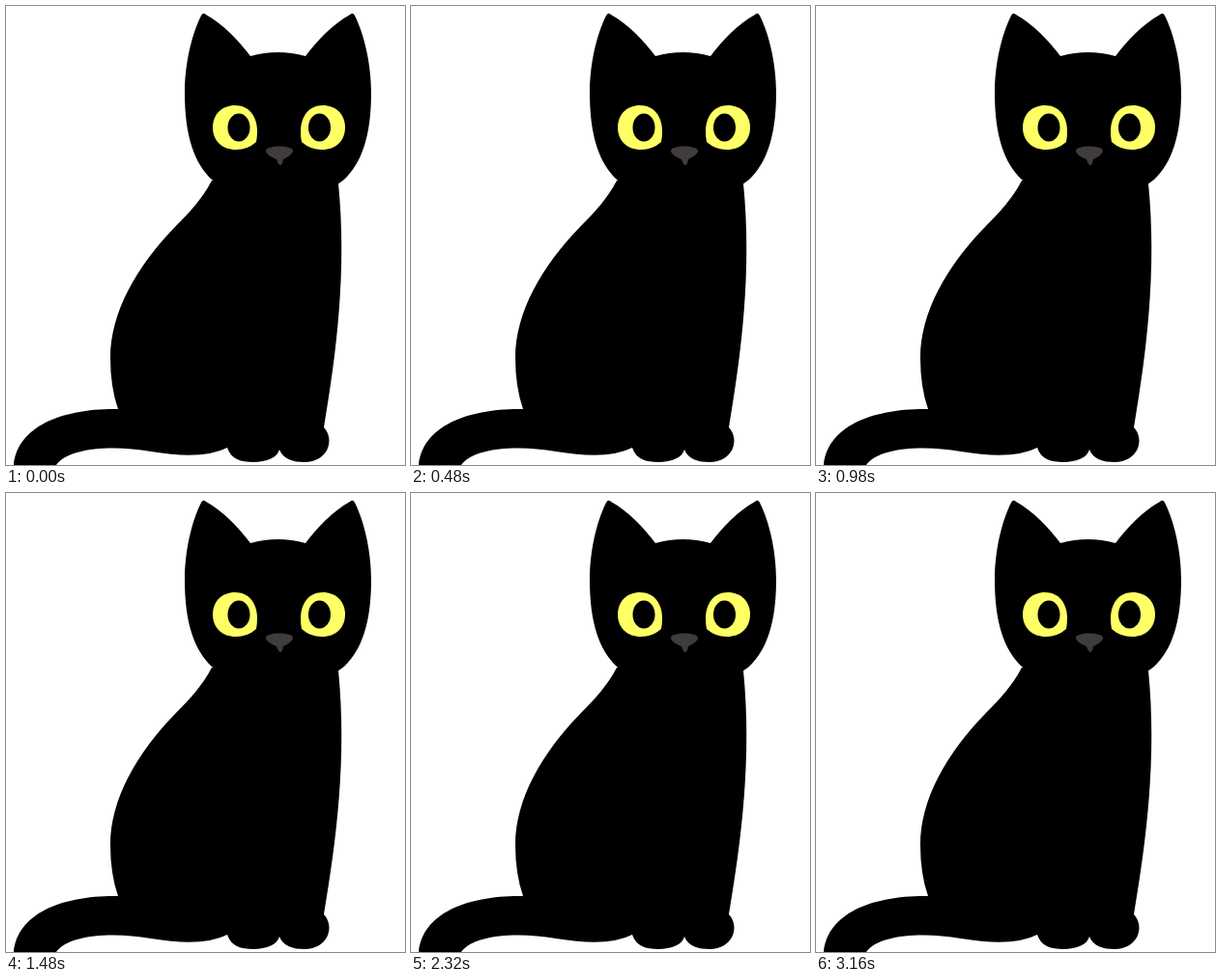
Animation of 413x476 px, one loop 3580 ms. Source, as an HTML page:

```html
<!DOCTYPE html>
<html lang="en">
<head>
<meta charset="utf-8">
<title>Black cat</title>
<style>
  html, body { margin: 0; width: 100%; height: 100%; overflow: hidden; background: #fff; }
  svg { display: block; width: 413px; height: 476px; }
  #bones { fill: #fff; opacity: 0; }
  .line { fill: none; stroke: #fff; stroke-linecap: round; }
  .dark { fill: #000; }
</style>
</head>
<body>
<svg viewBox="0 0 413 476">
  <defs>
    <path id="head" d="M282 48Q267 48 253 52C241 36 225 19 207 9Q204 6 202 10C192 30 185 60 185 90C185 135 195 163 213 180Q222 188 245 195H282Z"/>
    <path id="eye" d="M214 126C214 112 224 103 237 103C251 103 260 114 260 130Q260 136 259 141Q250 149 238 149C224 149 214 140 214 126Z"/>
    <g id="skull">
      <path d="M283 68C232 68 203 92 203 122C203 152 219 168 250 168Q252 176 258 180Q261 182 263 178L267 171H283Z"/>
      <path d="M283 180H273L266 186Q274 188 283 188Z"/>
      <path class="dark" d="M214 126C214 112 225 103 237 103C251 103 260 115 260 132Q260 141 254 145Q246 148 237 147C223 147 214 139 214 126Z"/>
    </g>
    <path id="shoulder" d="M237 215Q241 200 249 205L284 220Q288 223 281 225C265 229 250 228 241 225Q235 222 237 215Z"/>
  </defs>

  <use href="#head"/>
  <use href="#head" transform="translate(563) scale(-1 1)"/>
  <path d="M213 181C203 200 190 214 176 228C135 270 108 318 108 365Q108 395 116 418C60 417 12 435 8 476H52C65 458 110 455 150 462Q204 471 229 458C233 470 243 473 256 473C270 473 281 468 283 460C287 470 297 473 309 473C333 473 341 450 329 437C342 360 353 275 344 184Z"/>

  <g fill="#ffff66">
    <use href="#eye"/>
    <use href="#eye" transform="translate(565) scale(-1 1)"/>
  </g>
  <g id="pupils">
    <ellipse cx="241" cy="126" rx="11.5" ry="14.5"/>
    <ellipse cx="324.5" cy="126" rx="11.5" ry="14.5"/>
  </g>
  <path fill="#403c3d" d="M269 150C269 144 297 144 297 150C297 154 291 157 287 159Q286 165 284 165Q282 165 280 159C275 157 269 154 269 150Z"/>

  <!-- the skull covers the face while it shows -->
  <g id="bones">
    <use href="#skull"/>
    <use href="#skull" transform="translate(565.5) scale(-1 1)"/>
    <ellipse class="dark" cx="284" cy="153" rx="11" ry="5.5"/>
    <use href="#shoulder"/>
    <use href="#shoulder" transform="translate(522) scale(-.78 1)"/>
    <rect x="123.5" y="365" width="40" height="53" rx="19" ry="22" transform="rotate(-4 143 391)"/>
    <circle class="dark" cx="142.5" cy="398" r="8"/>
    <path d="M163 438C166 432 176 436 177 444Q180 447 196 446Q208 447 207 453Q203 458 178 457Q158 457 158 452Q163 447 161 441Z"/>
    <ellipse cx="259" cy="453.5" rx="13.7" ry="7.5"/>
    <ellipse cx="309" cy="453" rx="14" ry="7.5"/>
    <g id="built"></g>
  </g>
</svg>
<script>
  const line = (d, width) => `<path class="line" d="${d}" stroke-width="${width}"/>`;

  // two round knobs across the end of a bone
  const knobs = (x, y, angle) => [-6.3, 6.3].map(r =>
    `<circle cx="${x - r * Math.sin(angle)}" cy="${y + r * Math.cos(angle)}" r="7"/>`).join("");

  function bone(x1, y1, x2, y2, single) {
    const angle = Math.atan2(y2 - y1, x2 - x1);
    return line(`M${x1} ${y1}L${x2} ${y2}`, 12.5) +
      knobs(x2, y2, angle) + (single ? "" : knobs(x1, y1, angle));
  }

  const plate = (x, y, angle, length, round = 4) =>
    `<rect x="${-length / 2}" y="-7.2" width="${length}" height="14.4" rx="${round}"
      transform="translate(${x} ${y}) rotate(${angle})"/>`;

  const rib = i => line(`M${196 - 11 * i} ${228 + 15 * i}
    Q${210 - 5 * i} ${244 + 22 * i} 237 ${246 + 21.5 * i}`, 11.5);

  document.getElementById("built").innerHTML = [
    // spine, then tail
    plate(218.5, 206, 119, 28),
    plate(157, 281, 125, 24),
    plate(139, 313.5, 115, 25),
    plate(129, 349.5, 101, 30),
    plate(127, 433.5, -14, 33, 7),
    plate(91.5, 437, -6, 30),
    plate(58.5, 444.5, -25, 27),
    plate(34.5, 461, -48, 22),
    // ribs on their base
    line("M199 225L172 258", 9),
    ...[0, 1, 2].map(rib),
    // hind leg, then front legs
    bone(162, 357, 204.5, 317, true),
    bone(220.5, 342, 178, 423),
    bone(266, 249.5, 266, 321.5),
    bone(317.5, 249.5, 314.5, 321.5),
    bone(264, 343, 261, 429),
    bone(317, 343, 305.5, 429)
  ].join("");

  // flicker: [hold in ms, how often], slowing down
  const holds = [[80, 8], [170, 2], [250, 2], [420, 5]]
    .flatMap(([ms, count]) => Array(count).fill(ms));
  const loop = holds.reduce((sum, ms) => sum + ms);
  let time = 0;
  const steps = holds.map((ms, i) => {
    const offset = time / loop * (1 - 1e-6);
    time += ms;
    return { offset, opacity: i % 2, easing: "step-end" };
  });
  document.getElementById("bones").animate(
    [...steps, { offset: 1, opacity: 0 }], { duration: loop, iterations: Infinity });
</script>
</body>
</html>
```
